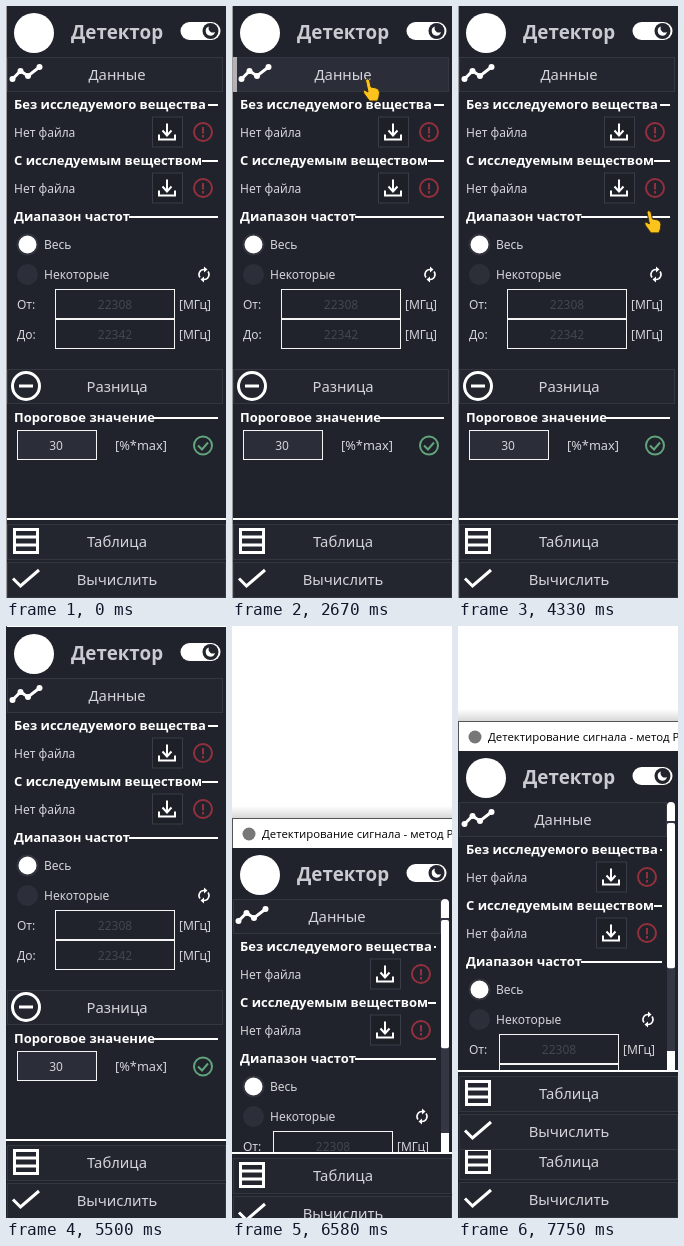
An HTML page for the animation above (8 s loop, 220 by 592 pixels).

```html
<!DOCTYPE html>
<html lang="ru">
<head>
<meta charset="utf-8">
<style>
  html, body { margin: 0; width: 100%; height: 100%; overflow: hidden; background: #fff; }
  svg { display: block; }
  text { font: 12px "Noto Sans", "Open Sans", sans-serif; fill: #d3d4d9; dominant-baseline: alphabetic; }
  .head { font-size: 13px; font-weight: 700; fill: #fff; }
  .name { font-size: 18.8px; font-weight: 700; fill: #c9cbd1; }
  .cap { font-size: 14.8px; text-anchor: middle; }
  .mid { text-anchor: middle; }
  .unit { font-size: 12.8px; }
  .dim { fill: #434650; }
  .title { font: 11.4px "Open Sans", "Noto Sans", sans-serif; fill: #000; }
  .bg { fill: #20232b; }
  .btn { fill: #23262e; stroke: #343740; }
  .tool { fill: #1e2028; stroke: #3a3d47; }
  .field { fill: none; stroke: #f4f4f4; }
  .filled { fill: #2b2e38; }
  .rule { stroke: #fff; stroke-width: 2; }
  .icon { fill: none; stroke: #fff; stroke-width: 3; }
  .thin { fill: none; stroke: #fff; stroke-width: 2; }
  .turn { fill: none; stroke: #fff; stroke-width: 1.6; }
  .bad { fill: none; stroke: #94303d; stroke-width: 2; }
  .good { fill: none; stroke: #62a57c; stroke-width: 2; }
  .mark { fill: #b3b1b6; visibility: hidden; }
  .hover .mark { visibility: visible; }
  .hover .btn { fill: #2b2e38; }
  .hover .sign { transform: translateX(3px); }
  .press .btn { fill: #b0abae; stroke: #b0abae; }
  .press .cap { fill: #98949a; }
  .press .mark { visibility: hidden; }
  .press .sign { transform: none; }
  .narrow .right { transform: translateX(-8px); }
  .narrow .cap { transform: translateX(-6px); }
</style>
</head>
<body>
<svg width="220" height="592" viewBox="0 0 220 592">
  <defs>
    <linearGradient id="shade" x2="0" y2="1">
      <stop stop-color="#fff"/><stop offset="1" stop-color="#d8d8d8"/>
    </linearGradient>
    <g id="load">
      <rect class="tool" x="146.500" y="-15.500" width="30" height="30"/>
      <path class="thin" d="M161 -9V3M156.500 -2L161 3L165.500 -2M153 2V7H169V2"/>
    </g>
    <g id="alert" class="bad">
      <circle cx="197" r="9"/>
      <path d="M197 -5V1.500M197 3V5.500"/>
    </g>
    <g id="footer">
      <rect class="bg" y="512" width="220" height="80"/>
      <path class="rule" d="M0 513H220"/>
      <rect class="btn" x="1.500" y="518.500" width="218" height="35"/>
      <rect class="btn" x="1.500" y="556.500" width="218" height="35"/>
      <path class="icon" d="M8.500 523.500H31.500V546.500H8.500ZM8 531H32M8 539H32"/>
      <path class="icon" d="M7 572.500L14.500 580L33 564"/>
      <text class="cap" x="111" y="541">Таблица</text>
      <text class="cap" x="111" y="579">Вычислить</text>
    </g>
  </defs>

  <use href="#footer"/>
  <g id="win">
    <rect class="bg" y="0" width="220" height="52"/>
    <rect y="-42" width="220" height="12" fill="url(#shade)"/>
    <rect y="-30" width="220" height="30" fill="#fff"/>
    <path d="M0 -29.500H220M.5 -30V0" stroke="#555" fill="none"/>
    <circle cx="17" cy="-14" r="6.500" fill="#777"/>
    <text class="title" x="30" y="-10">Детектирование сигнала - метод Р</text>
    <circle cx="28" cy="27" r="20" fill="#fff"/>
    <text class="name" x="65" y="33">Детектор</text>
    <rect x="174.500" y="16" width="40" height="18" rx="9" fill="#fff"/>
    <circle cx="204.500" cy="25" r="8" fill="#22252d"/>
    <path d="M203 20.500A4.700 4.700 0 1 0 209 26A4.300 4.300 0 0 1 203 20.500Z" fill="#fff"/>

    <svg id="view" y="51" width="220" height="462" overflow="hidden">
      <rect class="bg" width="220" height="480"/>
      <g transform="translate(0 -51)">
        <g id="data">
          <rect class="btn wide" x="1.500" y="51.500" width="215" height="34"/>
          <rect class="mark" x="1" y="51" width="4" height="35"/>
          <g class="sign" fill="#fff">
            <path class="icon" d="M6.500 73L14.500 65L22 70L33.500 61"/>
            <circle cx="6.500" cy="73" r="3"/><circle cx="14.500" cy="65" r="3"/><circle cx="22" cy="70" r="3"/><circle cx="33.500" cy="61" r="3"/>
          </g>
          <text class="cap" x="111" y="73.500">Данные</text>
        </g>

        <text class="head" x="8" y="103">Без исследуемого вещества</text>
        <path class="rule" data-x="202" data-y="99"/>
        <text x="8" y="131">Нет файла</text>
        <g class="right"><use href="#load" y="126.500"/><use href="#alert" y="126"/></g>

        <text class="head" x="8" y="159">С исследуемым веществом</text>
        <path class="rule" data-x="196" data-y="155"/>
        <text x="8" y="187">Нет файла</text>
        <g class="right"><use href="#load" y="182.500"/><use href="#alert" y="182"/></g>

        <text class="head" x="8" y="215">Диапазон частот</text>
        <path class="rule" data-x="123" data-y="211"/>
        <circle cx="21.500" cy="238.500" r="10" fill="#fff" stroke="#31343f" stroke-width="2"/>
        <text x="38" y="243">Весь</text>
        <circle cx="21.500" cy="268.500" r="10.500" fill="#2c2f39"/>
        <text x="38" y="273">Некоторые</text>
        <g class="right">
          <path class="turn" d="M194 271.500A5 5 0 0 1 198 263.500M202 265.500A5 5 0 0 1 198 273.500"/>
          <path d="M198 260.500L201.500 263.500L198 266.500ZM198 270.500L194.500 273.500L198 276.500Z" fill="#fff"/>
        </g>

        <text x="11" y="303">От:</text>
        <text x="11" y="333">До:</text>
        <g class="right">
          <rect class="field" x="49.500" y="283.500" width="119" height="29"/>
          <rect class="field" x="49.500" y="313.500" width="119" height="29"/>
          <text class="mid dim" x="109" y="303">22308</text>
          <text class="mid dim" x="109" y="333">22342</text>
          <text x="173" y="303">[МГц]</text>
          <text x="173" y="333">[МГц]</text>
        </g>

        <g id="diff">
          <rect class="btn wide" x="1.500" y="363.500" width="215" height="34"/>
          <rect class="mark" x="1" y="363" width="4" height="35"/>
          <g class="sign">
            <circle class="icon" cx="20" cy="380" r="13.500"/>
            <path class="icon" d="M13 380H27"/>
          </g>
          <text class="cap" x="111" y="385.500">Разница</text>
        </g>

        <text class="head" x="8" y="416">Пороговое значение</text>
        <path class="rule" data-x="148" data-y="412"/>
        <rect class="field filled" x="11.500" y="424.500" width="79" height="29"/>
        <text class="mid" x="50" y="444">30</text>
        <g class="right">
          <text class="unit" x="109" y="444">[%*max]</text>
          <g class="good"><circle cx="197" cy="439.500" r="9"/><path d="M192 439.500L196 443.500L202 436.500"/></g>
        </g>
      </g>
      <g id="bar" fill="#fff">
        <rect x="209" y="10" width="8" height="480" fill="#343743"/>
        <path d="M209 19V4Q209 0 213 0T217 4V19Z"/>
        <rect id="thumb" x="209" y="21" width="8" rx="2"/>
        <rect id="end" x="209" width="8" height="20"/>
      </g>
    </svg>
  </g>
  <use id="foot" href="#footer"/>
  <rect id="edge" width="1" height="592" fill="#9c9c9f"/>

  <path id="hand" fill="#fbc31c" stroke="#3b2d12" stroke-linejoin="round"
    d="M2.500 2Q4 -.5 6.500 2L8 9L13 10Q16.500 11 16.500 14.500L16 19L14.500 23H6.500L1 15.500Q-.5 12.500 1.500 12L5 14Z"/>
</svg>
<script>
const LOOP = 8000, FPS = 12, CONTENT = 424;
const $ = id => document.getElementById(id);
const rules = document.querySelectorAll('[data-x]');
const wides = document.querySelectorAll('.wide');

// [step, window top] while the upper edge is dragged
const tops = [[0, -30], [66, -29], [67, -14], [68, 9], [70, 28], [71, 56], [72, 92], [73, 122],
  [74, 142], [76, 174], [78, 178], [79, 192], [81, 197], [82, 201], [83, 203],
  [89, 201], [90, 196], [91, 186], [92, 163], [93, 95]];

// [step, x, y] of the pointer
const path = [[9, 150, -9], [14, 128, 66], [30, 128, 66], [32, 131, 72], [40, 113, 376],
  [49, 113, 376], [53, 200, 172]];

// [button, first step, end step]
const clicks = [['data', 22, 24], ['data', 26, 27], ['diff', 41, 43]];

function pointer(n) {
  const i = path.findIndex(p => p[0] >= n);
  if (i < 0 || n < path[0][0]) return null;
  if (i === 0) return path[0].slice(1);
  const [a, ax, ay] = path[i - 1], [b, bx, by] = path[i];
  const u = (n - a) / (b - a), e = u * u * (3 - 2 * u);
  return [ax + (bx - ax) * e, ay + (by - ay) * e];
}

function drawPointer(n) {
  const p = pointer(n);
  $('hand').style.display = p ? '' : 'none';
  if (p) $('hand').setAttribute('transform', `translate(${p})`);
  for (const [id, y] of [['data', 51], ['diff', 363]]) {
    const over = p && p[1] >= y && p[1] < y + 35;
    const down = clicks.some(([c, a, b]) => c === id && n >= a && n < b);
    $(id).setAttribute('class', (over ? 'hover ' : '') + (down ? 'press' : ''));
  }
}

// The contents keep the height of the preceding drag step.
function drawWindow(n) {
  const i = tops.filter(s => s[0] <= n).length - 1;
  const top = tops[i][1], lag = i ? top - tops[i - 1][1] : 0;
  const shift = top + 30, h = 462 + lag - shift, narrow = h < CONTENT;
  $('win').setAttribute('transform', `translate(0 ${shift})`);
  $('win').setAttribute('class', narrow ? 'narrow' : '');
  $('foot').setAttribute('y', lag);
  $('view').setAttribute('height', h);
  $('edge').style.display = i ? 'none' : '';
  $('bar').style.display = narrow ? '' : 'none';
  $('thumb').setAttribute('height', Math.max(0, (h - 40) * h / CONTENT));
  $('end').setAttribute('y', h - 20);
  const cut = narrow ? 8 : 0;
  wides.forEach(w => w.setAttribute('width', 215 - cut));
  rules.forEach(r => r.setAttribute('d', `M${r.dataset.x} ${r.dataset.y}H${212 - cut}`));
}

function frame() {
  const n = Math.floor((performance.now() % LOOP + 4) * FPS / 1000);
  drawWindow(n);
  drawPointer(n);
  requestAnimationFrame(frame);
}
frame();
</script>
</body>
</html>
```
